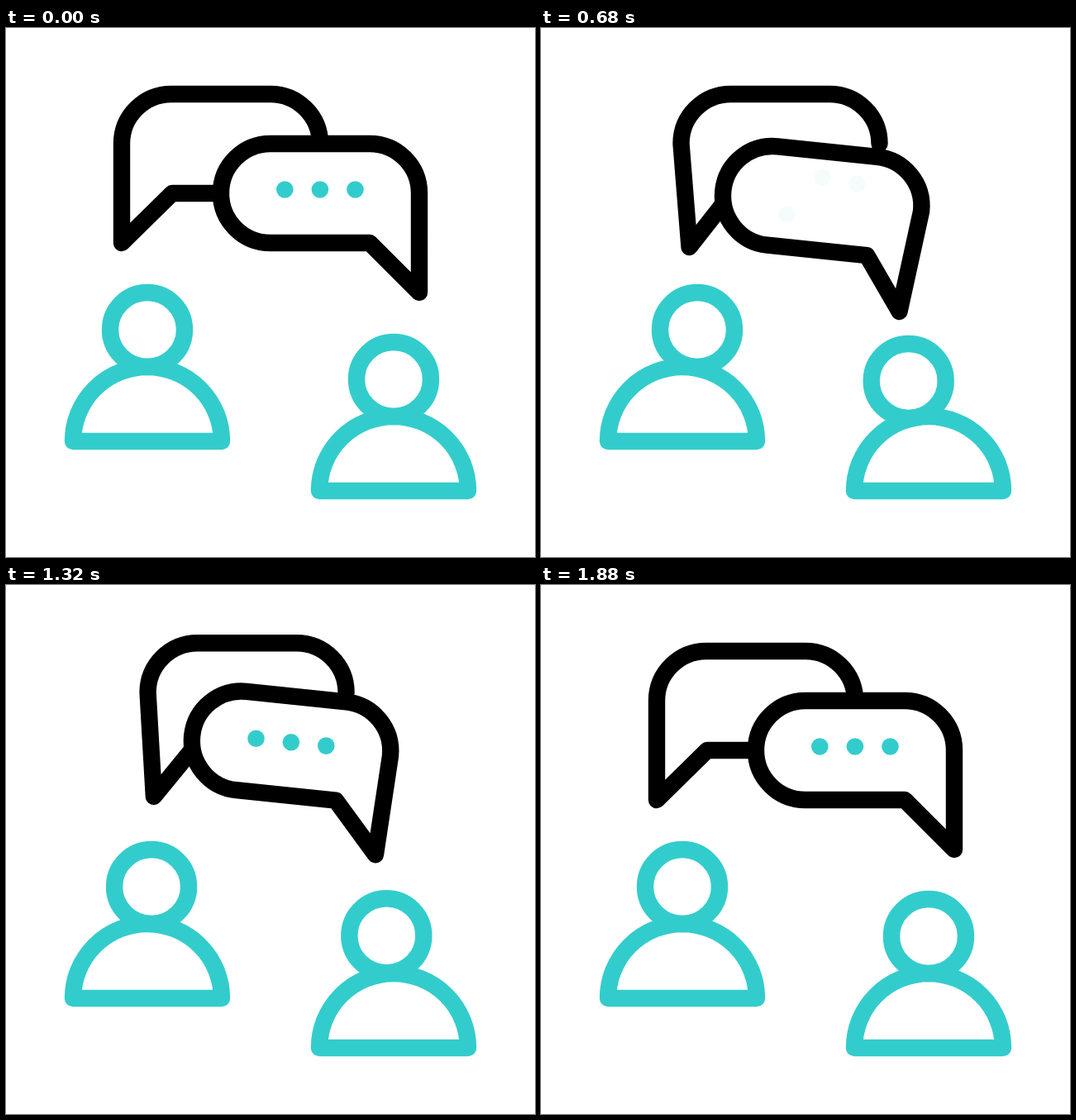
An HTML page with a canvas that plays this animation: 640x640 px, repeating every 2000 ms.

```html
<!DOCTYPE html>
<html lang="en">
<head>
<meta charset="utf-8">
<title>Conversation</title>
<style>
  html, body { margin: 0; width: 100%; height: 100%; overflow: hidden; background: #fff; }
  canvas { display: block; width: 640px; height: 640px; }
</style>
</head>
<body>
<canvas id="stage" width="640" height="640"></canvas>
<script>
const ctx = document.getElementById('stage').getContext('2d');
const LOOP = 2000, STEP = 40;
const TEAL = '#33cccc', BLACK = '#000';

const clamp = v => Math.min(1, Math.max(0, v));
const ramp = (t, a, b) => clamp((t - a) / (b - a));
const ease = (t, a, b) => { const u = ramp(t, a, b); return u * u * (3 - 2 * u); };

// rest + lean * shift + hop * jump
const pose = (rest, shift, jump, lean, hop) =>
  rest.map((v, i) => v + shift[i] * lean + jump[i] * hop);

function stroke(color) {
  ctx.strokeStyle = color;
  ctx.stroke();
}

function person(x, base, head) {
  ctx.beginPath();
  ctx.arc(x, base, 90, Math.PI, 0);
  ctx.closePath();
  stroke(TEAL);
  ctx.beginPath();
  ctx.arc(head[0], head[1], 45, 0, Math.PI * 2);
  stroke(TEAL);
}

function backBubble(body, tip) {
  const [x, y] = body;
  ctx.beginPath();
  ctx.moveTo(x + 120, y + 60);
  ctx.lineTo(x + 1, y + 60);
  ctx.lineTo(tip[0], tip[1]);
  ctx.lineTo(x - 60, y);
  ctx.arc(x, y, 60, Math.PI, Math.PI * 1.5);
  ctx.arc(x + 120, y, 60, Math.PI * 1.5, Math.PI * 2);
  stroke(BLACK);
}

function frontBubble(left, right, tip, angle) {
  const q = Math.PI / 2;
  ctx.beginPath();
  ctx.arc(left[0], left[1], 60, angle + q, angle + 3 * q);
  ctx.arc(right[0], right[1], 60, angle - q, angle);
  ctx.lineTo(tip[0], tip[1]);
  ctx.lineTo(right[0] - 60 * Math.sin(angle), right[1] + 60 * Math.cos(angle));
  ctx.closePath();
  ctx.fillStyle = '#fff';
  ctx.fill();
  stroke(BLACK);
}

// Dots leave upwards one after another and come back from below.
function dots(t, left, angle) {
  const c = Math.cos(angle), s = Math.sin(angle);
  ctx.fillStyle = TEAL;
  ctx.globalAlpha = t < 700 ? 1 - ramp(t, 490, 690) : ramp(t, 710, 948);
  for (let i = 0; i < 3; i++) {
    const start = 437 + 33 * i, mid = start + 240;
    const dy = t < mid ? -25 * ease(t, start, mid) : 25 * (1 - ease(t, mid, mid + 240));
    const u = 17.3 + 42.6 * i, v = -4.5;
    ctx.beginPath();
    ctx.arc(left[0] + u * c - v * s, left[1] + u * s + v * c + dy, 10.3, 0, Math.PI * 2);
    ctx.fill();
  }
  ctx.globalAlpha = 1;
}

function draw(t) {
  const back = 1 - ease(t, 1500, 1868);
  const hop = ease(t, 960, 1208) - ease(t, 1208, 1480);
  const lean = (a, b) => ease(t, a, b) * back;
  const lead = lean(100, 260), main = lean(100, 335), tail = lean(100, 365);
  const reply = lean(335, 577);

  ctx.fillStyle = '#fff';
  ctx.fillRect(0, 0, 640, 640);
  ctx.lineWidth = 20.4;
  ctx.lineJoin = ctx.lineCap = 'round';

  person(171, 500, pose([171, 365], [18, 0], [-20.5, 0], reply, hop));
  person(469, 560, pose([469, 425], [-24.3, 2], [24.8, -4.4], main, hop));

  backBubble(
    pose([200, 80 + 60], [29.5, 0], [3.3, -15.5], reply, hop),
    pose([140, 260], [39.5, 5], [-1, -14.5], reply, hop));

  const left = pose([320, 200], [-40, 3], [7.7, -23], lead, hop);
  const right = pose([440, 200], [-39.6, 15.5], [7.7, -23], main, hop);
  const tip = pose([500, 320], [-66.5, 23], [21.3, -26.5], tail, hop);
  const angle = Math.atan2(right[1] - left[1], right[0] - left[0]);
  frontBubble(left, right, tip, angle);
  dots(t, left, angle);
}

const begin = performance.now();
function tick() {
  const t = (performance.now() - begin) % LOOP;
  draw(Math.floor(t / STEP) * STEP);
  requestAnimationFrame(tick);
}
tick();
</script>
</body>
</html>
```
